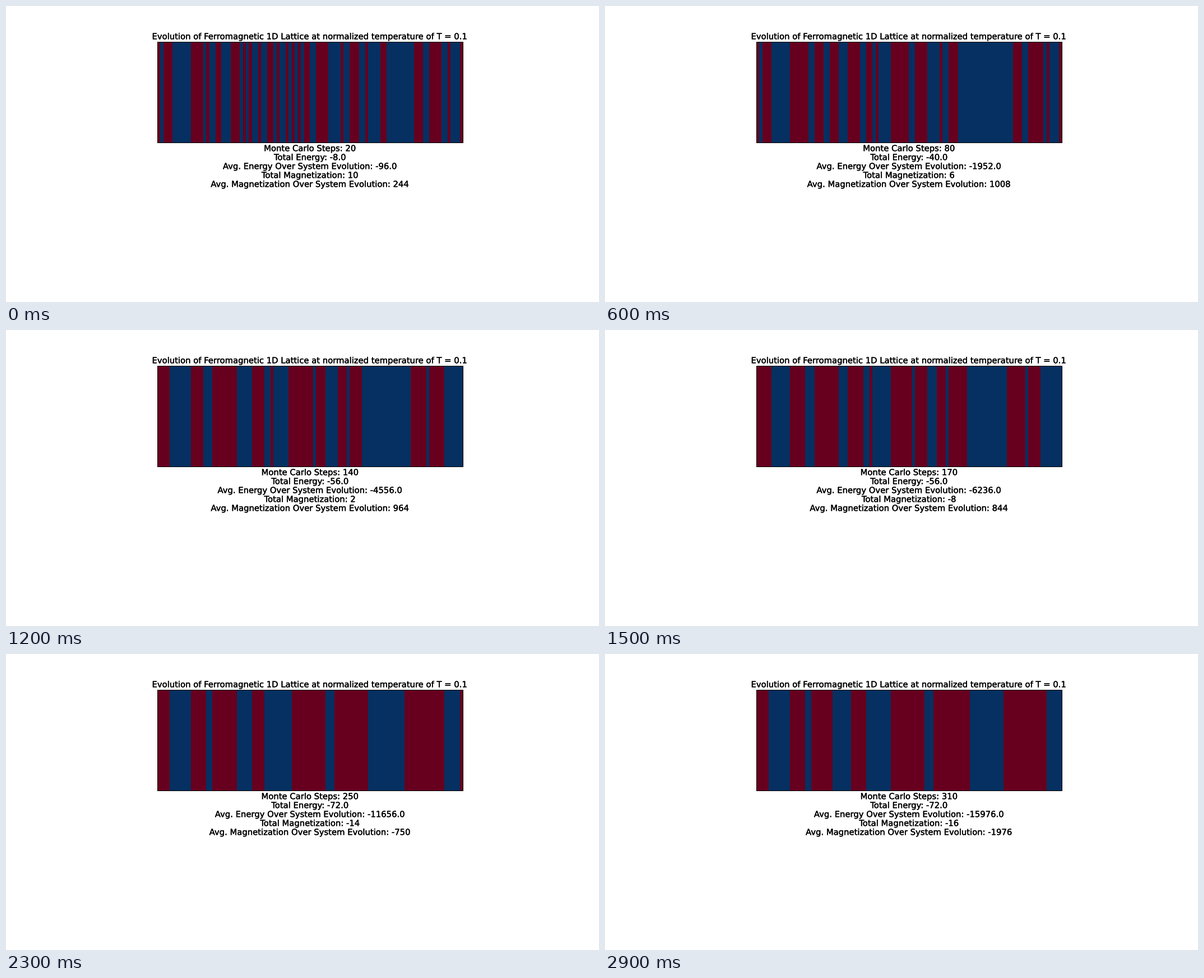
These frames come from a looping animation (1058x529 px, 3000 ms). A matplotlib script:

```python
import numpy as np
import matplotlib.pyplot as plt
from matplotlib import patheffects
from matplotlib.animation import FuncAnimation
from matplotlib.colors import ListedColormap

plt.rcParams["font.family"] = "DejaVu Sans"

W, H, DPI = 1058, 529, 64
SITES, FRAMES, INTERVAL = 100, 30, 100
LEFT, TOP, RIGHT, BOTTOM = 270.2, 63.55, 814.8, 244.4
CENTER, FONT_PX, LINE_PITCH = 542.5, 14.8, 16

# Walls between lasting domains drift from first to last place; spin -1 comes first.
FIRST = np.array([5, 11, 15, 19, 27, 30, 34, 44, 56, 60, 66, 84, 93, 99])
LAST = np.array([4, 11, 16, 18, 25, 31, 36, 44, 55, 58, 70, 81, 95, 100])

# Small domains that shrink away, grouped by the frame when the whole group is gone.
BUBBLES = {
    3: [(28, 29), (31, 33), (42, 43), (45, 46), (47, 48), (68, 69), (73, 75)],
    12: [(1, 2), (16, 17), (21, 24), (39, 40), (95, 96)],
    18: [(36, 38), (50, 52), (61, 63), (87, 89)],
}

# Key points of the running sums.
KEY_FRAMES = [0, 6, 12, 15, 20, 25, 29]
ENERGY_SUMS = [-96, -1952, -4556, -6236, -9496, -13096, -15976]
MAGNET_SUMS = [244, 1008, 964, 844, 64, -1292, -1976]

rng = np.random.default_rng(4)
phase = rng.uniform(0, 2 * np.pi, len(FIRST))
rate = rng.uniform(15, 40, len(FIRST))


def lattice(frame):
    u = frame / (FRAMES - 1)
    wobble = 0.6 * np.sin(np.pi * u) * np.sin(phase + rate * u)
    walls = np.rint(FIRST + (LAST - FIRST) * u + wobble)
    domain = np.searchsorted(walls, np.arange(SITES), side="right")
    spins = np.where(domain % 2 == 0, -1, 1)
    for gone, group in BUBBLES.items():
        for i, (a, b) in enumerate(group):
            life = gone - i % 3
            width = int(np.ceil((b - a) * max(0, 1 - frame / life)))
            spins[b - width:b] *= -1
    return spins


def running_sum(frame, sums):
    return 2 * int(round(np.interp(frame, KEY_FRAMES, sums) / 2))


def px(length):
    return length * 72 / DPI


fig = plt.figure(figsize=(W / DPI, H / DPI), dpi=DPI, facecolor="white")
ax = fig.add_axes([LEFT / W, 1 - BOTTOM / H, (RIGHT - LEFT) / W, (BOTTOM - TOP) / H])
ax.set_xticks([])
ax.set_yticks([])
for spine in ax.spines.values():
    spine.set_linewidth(px(1))
image = ax.imshow(lattice(0)[None, :], cmap=ListedColormap(["#67001f", "#053061"]),
                  vmin=-1, vmax=1, aspect="auto", interpolation="nearest")


def centered_text(baseline, text=""):
    heavier = patheffects.withStroke(linewidth=px(0.4), foreground="black")
    return fig.text(CENTER / W, 1 - baseline / H, text, ha="center", va="baseline",
                    fontsize=px(FONT_PX), color="black", path_effects=[heavier])


centered_text(59.3, "Evolution of Ferromagnetic 1D Lattice at normalized temperature of T = 0.1")
labels = [centered_text(259.3 + LINE_PITCH * i) for i in range(5)]


def update(frame):
    spins = lattice(frame)
    energy = -np.sum(spins * np.roll(spins, -1))
    image.set_data(spins[None, :])
    lines = [
        f"Monte Carlo Steps: {20 + 10 * frame}",
        f"Total Energy: {energy:.1f}",
        f"Avg. Energy Over System Evolution: {running_sum(frame, ENERGY_SUMS):.1f}",
        f"Total Magnetization: {spins.sum()}",
        f"Avg. Magnetization Over System Evolution: {running_sum(frame, MAGNET_SUMS)}",
    ]
    for label, line in zip(labels, lines):
        label.set_text(line)
    return [image, *labels]


anim = FuncAnimation(fig, update, frames=FRAMES, interval=INTERVAL,
                     init_func=lambda: update(0), repeat=True)
plt.show()
```
